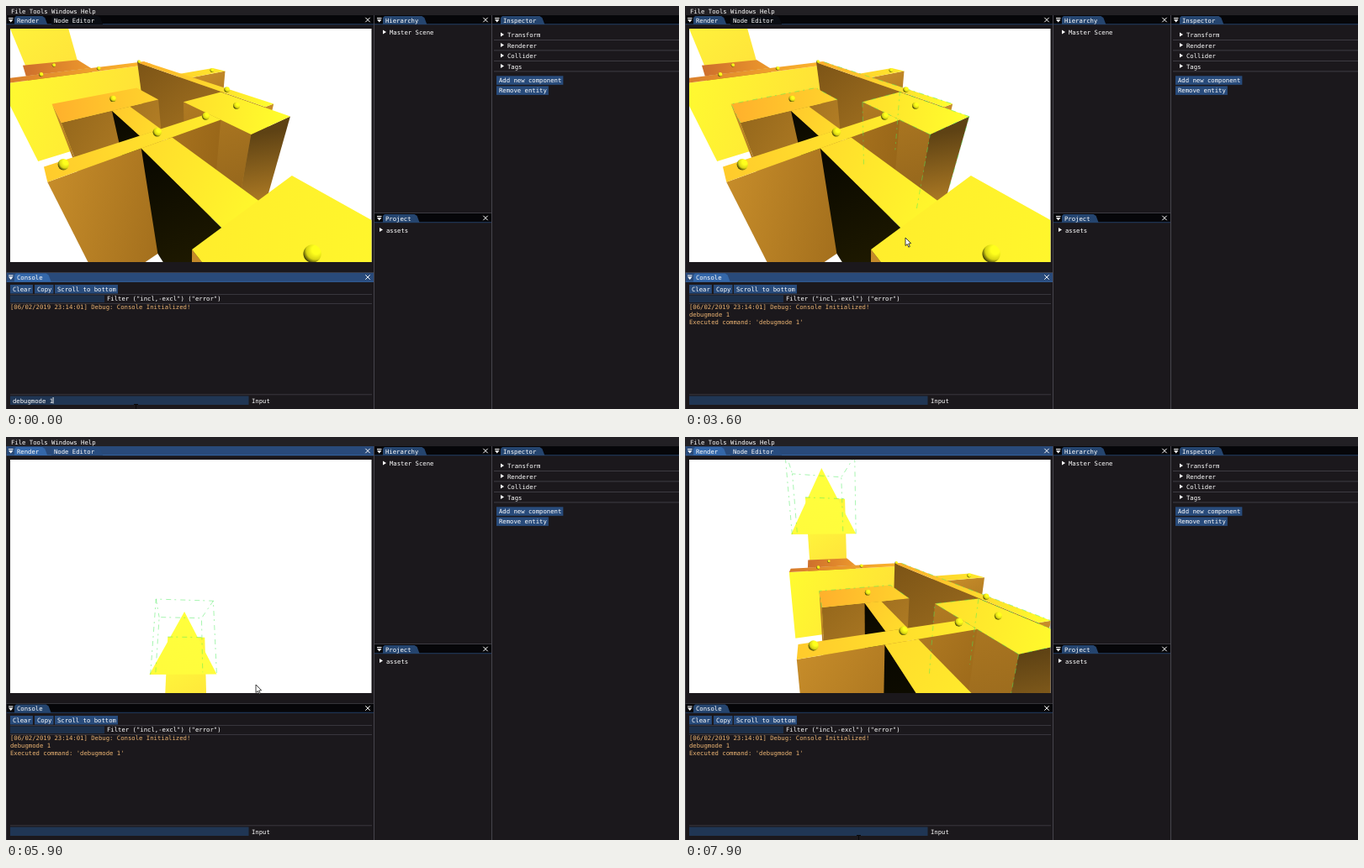
Write an HTML page with a canvas that moves like this. It is 800 px wide and 480 px high and loops after 8 s.

```html
<!DOCTYPE html>
<html lang="en">
<head>
<meta charset="utf-8">
<title>Scene editor</title>
<style>
html, body { margin: 0; width: 100%; height: 100%; overflow: hidden; background: #1b181c; }
canvas { display: block; }
</style>
</head>
<body>
<canvas id="stage" width="800" height="480"></canvas>
<script>
const ctx = document.getElementById('stage').getContext('2d');
const LOOP = 8000, STEP = 100, ENTER = 1400, FOCUS = 4300;
const FOCAL = 241, CX = 220, CY = 166, NEAR = 0.05, RAD = Math.PI / 180;
// World units: camera at the origin, y points down, every box spans TOP to BASE.
const TOP = 1, BASE = 2.7, TOWER_Z = 6.6, BALL = 0.043;

// [time, yaw, pitch down] in degrees
const cameraKeys = [
  [3650, 37.3, 32.3], [4150, 1.8, -24.2], [5250, 1.8, -24.2],
  [5900, 5.9, -24.2], [6150, 10.8, -24.2], [6600, 13.9, -1.1], [6890, 16.3, 13.5]
];
// [time, x, y]
const mouseKeys = [
  [2300, 154, 475], [3300, 262, 276], [3600, 262, 276], [4200, 242, 207], [4400, 242, 207],
  [4800, 233, 158], [5200, 257, 208], [5900, 297, 295], [6600, 331, 383], [7000, 458, 447], [7800, 206, 475]
];

function sample(keys, t) {
  if (t <= keys[0][0]) return keys[0].slice(1);
  const i = keys.findIndex(k => k[0] > t);
  if (i < 0) return keys[keys.length - 1].slice(1);
  const a = keys[i - 1], b = keys[i], k = (t - a[0]) / (b[0] - a[0]);
  return [a[1] + (b[1] - a[1]) * k, a[2] + (b[2] - a[2]) * k];
}

const faces = [], wires = [];
const face = (points, from, to, start = points[0], end = points[2]) =>
  faces.push({ points, from, to, start, end });

// Tops turn from orange, far left, to yellow, near right.
function topColor(x, z) {
  const light = Math.min(1, Math.max(0, 0.9 + 0.12 * x - 0.14 * z));
  return `rgb(${Math.min(255, 205 + 110 * light)}, ${110 + 145 * light}, 44)`;
}

const ORANGE = ['#c68c2a', '#976518'];
function box(x0, x1, z0, z1, front = ORANGE, left = ORANGE) {
  if (x0 > 0) face([[x0, TOP, z1], [x0, TOP, z0], [x0, BASE, z0], [x0, BASE, z1]], ...left);
  if (z0 > 0) face([[x0, TOP, z0], [x1, TOP, z0], [x1, BASE, z0], [x0, BASE, z0]], ...front);
  const top = [[x0, TOP, z0], [x1, TOP, z0], [x1, TOP, z1], [x0, TOP, z1]];
  face(top, topColor(x0, z1), topColor(x1, z0), top[3], top[1]);
}

const upright = (points, from, to) => face(points.map(([x, y]) => [x, y, TOWER_Z]), from, to);
const wireBox = (x0, x1, y0, y1, z0, z1) => {
  const ring = z => [[x0, y1, z], [x0, y0, z], [x1, y0, z], [x1, y1, z]];
  const near = ring(z0), far = ring(z1);
  wires.push(near, far, [near[1], far[1]], [near[2], far[2]]);
};

// Far to near
const BLACK = ['#080700', '#2a2300'];
upright([[-.05, -.87], [1.12, -.87], [1.12, TOP], [-.05, TOP]], '#ffff3c', '#ffe43a');
upright([[.46, -1.69], [1.45, .19], [-.53, .19]], '#ffff3c', '#fffb3c');
box(-.1, 1.15, 5.36, 6.7);
box(-.51, 2.5, 4.92, 5.36, ['#fffb30', '#ffdd38']);
box(2.45, 3.41, 3.24, 3.64);
box(2.31, 2.5, 1.42, 5.36, ORANGE, ['#7c5416', '#c08828']);
box(.09, 1.33, 2.52, 3.25, ['#96681c', '#bd8628']);
box(.66, .9, 1.71, 2.52, ORANGE, BLACK);
box(1.565, 2.29, 1.055, 2.23, ['#5e4214', '#b88226'], ['#b07a22', '#8c601a']);
box(-.16, 1.565, 1.49, 1.71);
box(.57, .9, .46, 1.49, ORANGE, BLACK);
box(.36, 1.3, -.6, .465);

wireBox(-.5, 1.45, -2.09, .19, TOWER_Z, 9.3);
wireBox(1.565, 2.29, TOP, 2.1, 1.055, 2.23);
wires.push([[-.05, -.87, TOWER_Z], [1.12, -.87, TOWER_Z]]);
wires.push([[2.5, TOP, 5.3], [2.5, TOP, 1.42]]);
wires.push([[.09, TOP, 2.52], [.09, TOP, 3.25], [1.33, TOP, 3.25], [1.33, TOP, 2.52]]);

// Ball positions, as x and z on the tops
const balls = [
  [.49, 6], [.15, 5.1], [1.23, 5], [2.29, 5.2], [3.1, 3.33], [2.36, 2.17],
  [.79, 2.83], [1.96, 1.61], [1.43, 1.6], [.8, 1.6], [-.03, 1.58], [.79, .08]
];

function toCamera([x, y, z], [yaw, pitch]) {
  const c = Math.cos(pitch * RAD), s = Math.sin(pitch * RAD);
  const ca = Math.cos(yaw * RAD), sa = Math.sin(yaw * RAD);
  const forward = x * sa + z * ca;
  return [x * ca - z * sa, c * y - s * forward, c * forward + s * y];
}

const toScreen = ([x, y, z]) => {
  const scale = FOCAL / Math.max(z, NEAR);
  return [CX + x * scale, CY + y * scale];
};

function clipNear(points) {
  const out = [];
  points.forEach((a, i) => {
    const b = points[(i + 1) % points.length];
    if (a[2] > NEAR) out.push(a);
    if ((a[2] > NEAR) !== (b[2] > NEAR)) {
      const k = (NEAR - a[2]) / (b[2] - a[2]);
      out.push(a.map((v, n) => v + (b[n] - v) * k));
    }
  });
  return out;
}

function trace(points) {
  ctx.beginPath();
  points.forEach(p => ctx.lineTo(...toScreen(p)));
}

function drawBall(x, y, r) {
  const shade = ctx.createRadialGradient(x + r * .45, y - r * .45, r * .5, x + r * .3, y - r * .3, r * 1.45);
  shade.addColorStop(0, '#ffff1c');
  shade.addColorStop(.55, '#d8d412');
  shade.addColorStop(1, '#2c2a04');
  ctx.fillStyle = shade;
  ctx.beginPath();
  ctx.arc(x, y, r, 0, 7);
  ctx.fill();
}

function drawScene(pose, debug) {
  const view = p => toCamera(p, pose);
  ctx.save();
  rect(5, 27, 429.5, 278, '#fff');
  ctx.beginPath();
  ctx.rect(5, 27, 429.5, 278);
  ctx.clip();
  for (const f of faces) {
    const shown = clipNear(f.points.map(view));
    if (shown.length < 3) continue;
    const shade = ctx.createLinearGradient(...toScreen(view(f.start)), ...toScreen(view(f.end)));
    shade.addColorStop(0, f.from);
    shade.addColorStop(1, f.to);
    ctx.fillStyle = shade;
    trace(shown);
    ctx.fill();
  }
  if (debug) {
    ctx.strokeStyle = 'rgba(70,235,90,.6)';
    ctx.lineWidth = 0.8;
    ctx.setLineDash([6, 4, 2, 5]);
    for (const w of wires) {
      const points = w.map(view);
      if (points.some(p => p[2] < NEAR)) continue;
      trace(points);
      ctx.stroke();
    }
  }
  for (const [x, z] of balls) {
    const p = view([x, TOP - BALL, z]);
    if (p[2] > NEAR) drawBall(...toScreen(p), BALL * FOCAL / p[2]);
  }
  ctx.restore();
}

function rect(x, y, w, h, color) {
  ctx.fillStyle = color;
  ctx.fillRect(x, y, w, h);
}

function text(s, x, y, color = '#fff') {
  ctx.fillStyle = color;
  ctx.fillText(s, x, y);
}

function shape(points, color) {
  ctx.fillStyle = color;
  ctx.beginPath();
  points.forEach(p => ctx.lineTo(...p));
  ctx.fill();
}

function button(label, x, y) {
  rect(x, y, ctx.measureText(label).width + 5, 10.5, '#284b7b');
  text(label, x + 3, y + 8);
}

function node(label, x, y) {
  shape([[x, y - 5.5], [x + 4, y - 3], [x, y - .5]], '#fff');
  text(label, x + 8, y);
}

function tab(label, x, y, color) {
  const right = x + ctx.measureText(label).width + 13;
  shape([[x, y + 11], [x, y + 3], [x + 2, y + 1], [right - 6, y + 1], [right - 3, y + 3], [right, y + 11]], color);
  text(label, x + 3, y + 8.7);
}

function titleBar(label, x, y, w, focused, closable = true) {
  rect(x, y, w, 11, focused ? '#294a7a' : '#060609');
  rect(x, y + 10.3, w, .9, focused ? '#3566a6' : '#24436d');
  rect(x + 3, y + 3, 5.5, 1, '#fff');
  shape([[x + 3, y + 5], [x + 8.5, y + 5], [x + 5.75, y + 8.5]], '#fff');
  tab(label, x + 10, y, focused ? '#3467a9' : '#25456f');
  if (!closable) return;
  const cx = x + w - 7, cy = y + 5.5;
  ctx.strokeStyle = '#fff';
  ctx.lineWidth = 1;
  ctx.beginPath();
  for (const d of [-2.7, 2.7]) {
    ctx.moveTo(cx - d, cy - 2.7);
    ctx.lineTo(cx + d, cy + 2.7);
  }
  ctx.stroke();
}

function drawPanels(t) {
  const line = '#46444c', log = '#ecb473', renderFocus = t >= FOCUS;
  rect(0, 0, 800, 480, '#1b181c');
  rect(0, 0, 800, 11, '#222024');
  text('File Tools Windows Help', 6, 9);

  titleBar('Render', 0, 11, 437, renderFocus);
  tab('Node Editor', 54, 11, renderFocus ? '#284c7e' : '#0a0d13');
  titleBar('Console', 0, 317.5, 437, !renderFocus);
  titleBar('Hierarchy', 438, 11, 139, false);
  titleBar('Project', 438, 247, 139, false);
  titleBar('Inspector', 578, 11, 222, false, false);

  rect(437, 11, 1, 469, line);
  rect(577, 11, 1, 469, line);
  rect(0, 317, 437, .7, line);
  rect(438, 246, 139, .8, line);
  rect(0, 11, .7, 469, line);

  node('Master Scene', 448, 34);
  node('assets', 444, 269.5);
  ['Transform', 'Renderer', 'Collider', 'Tags'].forEach((name, i) => {
    node(name, 588, 37 + i * 12.5);
    rect(580, 40 + i * 12.5, 220, .8, line);
  });
  button('Add new component', 583, 83.3);
  button('Remove entity', 583, 95.4);

  button('Clear', 5, 332);
  button('Copy', 34, 332);
  button('Scroll to bottom', 58, 332);
  for (const y of [343, 354, 462.5]) rect(5, y, 430, .7, line);
  rect(5, 344.5, 112, 8.5, '#1d304a');
  text('Filter ("incl,-excl") ("error")', 120, 351);
  text('[06/02/2019 23:14:01] Debug: Console Initialized!', 5, 361.3, log);
  if (t >= ENTER) {
    text('debugmode 1', 5, 370, log);
    text("Executed command: 'debugmode 1'", 5, 379, log);
  }
  rect(5, 464.5, 283.5, 10.5, '#203654');
  text('Input', 292, 472.5);
  const typed = t < ENTER ? 'debugmode 1' : '';
  text(typed, 8, 472.5);
  const caretOn = t < ENTER || (t - ENTER) % 1200 < 800;
  if (!renderFocus && caretOn) rect(7.5 + ctx.measureText(typed).width, 466, .9, 7.5, '#fff');
}

function drawMouse([x, y]) {
  if (y > 463 && x < 289) {
    rect(x - 2, y - 1, 5, 1, '#08080a');
    rect(x, y - 1, 1, 6, '#08080a');
    return;
  }
  const arrow = [[0, 0], [0, 9.5], [2.2, 7.6], [3.8, 11.2], [5.3, 10.5], [3.7, 7], [6.6, 6.7]];
  shape(arrow.map(([a, b]) => [x + a, y + b]), '#fff');
  ctx.closePath();
  ctx.strokeStyle = '#111';
  ctx.lineWidth = .8;
  ctx.stroke();
}

function draw(now) {
  const t = Math.floor(now % LOOP / STEP) * STEP;
  ctx.font = '7.27px "DejaVu Sans Mono", monospace';
  ctx.textRendering = 'geometricPrecision';
  drawPanels(t);
  drawScene(sample(cameraKeys, t), t >= ENTER);
  drawMouse(sample(mouseKeys, t));
  requestAnimationFrame(draw);
}
requestAnimationFrame(draw);
</script>
</body>
</html>
```
